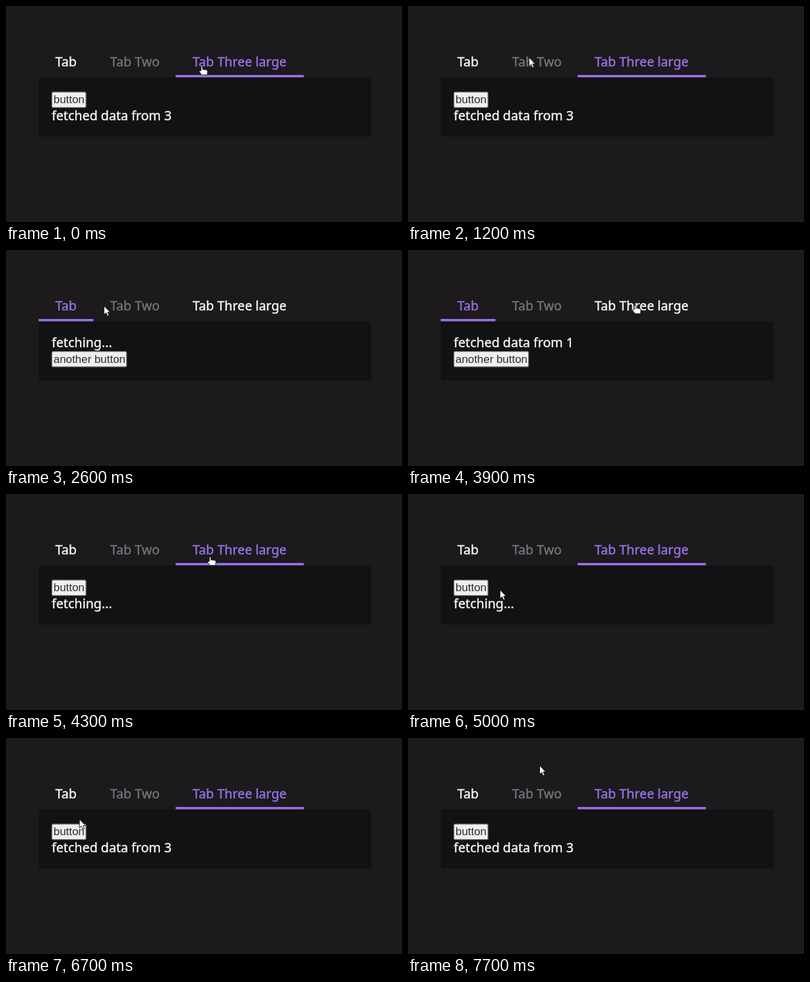
Animation, 600 px wide and 329 px high, one loop 7.8 s. Source, as an HTML page:

```html
<!DOCTYPE html>
<html lang="en">
<head>
<meta charset="utf-8">
<title>Tabs</title>
<style>
  html, body { margin: 0; width: 100%; height: 100%; overflow: hidden; background: #1c1a1d; }
  svg { display: block; width: 600px; height: 329px; }
  text { font: 19.6px "Noto Sans", "Open Sans", sans-serif; color: #f7f6f8;
         fill: currentColor; stroke: currentColor; stroke-width: .4; }
  .tab.off { color: #757377; }
  .tab.on { color: #9b70e3; }
  .bar { fill: #9b70e3; }
  .btn rect { fill: #efefef; stroke: #767676; stroke-width: 1.2; }
  .btn.down rect { fill: #f6f6f6; }
  .btn text { font: 16.9px "Liberation Sans", Arial, sans-serif; color: #2c2b2d; stroke: none; }
  .pointer { fill: #fff; stroke: #141316; stroke-width: .9; stroke-linejoin: round; }
  .hide { display: none; }
</style>
</head>
<body>
<svg viewBox="0 0 600 329">
  <rect width="600" height="329" fill="#1c1a1d"/>
  <rect x="49.7" y="109" width="503.8" height="90" fill="#121114"/>

  <text class="tab" id="tab1" x="74.7" y="92">Tab</text>
  <text class="tab off" x="157.7" y="92">Tab Two</text>
  <text class="tab" id="tab3" x="282.7" y="92">Tab Three large</text>
  <rect class="bar" id="bar" y="105" height="3.6"/>

  <text id="status" x="69.3"></text>
  <g class="btn" id="btn3">
    <rect x="69.6" y="131.1" width="51.5" height="23.6" rx="2"/>
    <text x="72" y="148">button</text>
  </g>
  <g class="btn" id="btn1">
    <rect x="69.6" y="154.6" width="113.1" height="23.3" rx="2"/>
    <text x="72" y="171.5">another button</text>
  </g>

  <g class="pointer" id="pointer">
    <path id="arrow" d="M.5 .5V13.8L3.6 11L5.8 16L8 15L5.9 10.2H9.8Z"/>
    <path id="hand" d="M2.4 7.5V1.6Q2.4 .4 3.6 .4T4.8 1.6V5L10.6 5.8Q12.5 6.2 12.4 8L11.8 13.5H3.6L0 8.9Q-.4 7 1.2 7Z"/>
  </g>
</svg>
<script>
const LOOP = 7800, STEP = 100, FETCH = 1000;
const $ = id => document.getElementById(id);

// each move eases to (x, y); bow bends its path up or down
const home = { x: 293, y: 91.5 };
const moves = [
  { from: 600, to: 1700, x: 99, y: 80, bow: -7 },
  { from: 2070, to: 3900, x: 340.5, y: 83.5, bow: 5 },
  { from: 4150, to: 4700, x: 150, y: 148, bow: 0 },
  { from: 4750, to: 5600, x: 97, y: 136, bow: 0 },
  { from: 6400, to: 7700, x: 199, y: 41.5, bow: 0 }
];

// tab clicks; the first one is already loaded
const clicks = [{ at: -FETCH, tab: 3 }, { at: 2000, tab: 1 }, { at: 4100, tab: 3 }];
const press = { from: 5700, to: 6000 };

const ease = k => k * k * (3 - 2 * k);

function pointerAt(t) {
  let { x, y } = home;
  for (const m of moves) {
    const k = Math.min(1, Math.max(0, (t - m.from) / (m.to - m.from)));
    x += (m.x - x) * ease(k);
    y += (m.y - y) * ease(k) + m.bow * Math.sin(Math.PI * k);
  }
  return { x, y };
}

const show = (id, on) => $(id).classList.toggle("hide", !on);

function draw(t) {
  const { at, tab } = clicks.filter(c => c.at <= t).pop();
  const first = tab === 1;
  $("tab1").classList.toggle("on", first);
  $("tab3").classList.toggle("on", !first);
  $("bar").setAttribute("x", first ? 49.5 : 257);
  $("bar").setAttribute("width", first ? 83 : 194.3);
  show("btn1", first);
  show("btn3", !first);
  $("btn3").classList.toggle("down", t >= press.from && t < press.to);

  const status = $("status");
  status.setAttribute("y", first ? 148 : 174);
  status.textContent = t - at < FETCH ? "fetching..." : "fetched data from " + tab;

  const { x, y } = pointerAt(t);
  const overTab = y > 60 && y < 109 && (x > 50 && x < 132 || x > 257 && x < 451);
  show("hand", overTab);
  show("arrow", !overTab);
  $("pointer").setAttribute("transform", `translate(${x} ${y})`);
}

const start = performance.now();
function tick(now) {
  const t = Math.max(0, now - start) % LOOP;
  draw(Math.floor(t / STEP) * STEP);
  requestAnimationFrame(tick);
}
draw(0);
requestAnimationFrame(tick);
</script>
</body>
</html>
```
